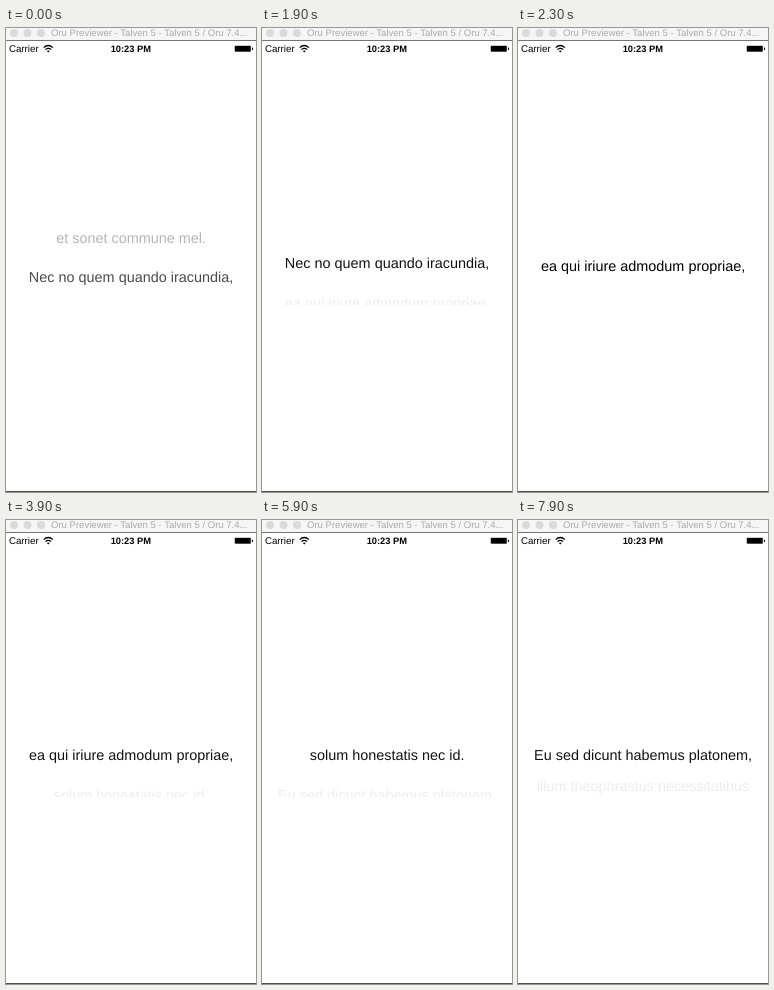
These frames come from a looping animation (250 by 464 pixels, 8 s). An HTML page:

```html
<!DOCTYPE html>
<html lang="en">
<head>
<meta charset="utf-8">
<title>Scrolling label</title>
<style>
  html, body { margin: 0; width: 100%; height: 100%; overflow: hidden; background: #fff; }
  svg { display: block; width: 250px; height: 464px; }
  text {
    font-family: "Liberation Sans", Arial, sans-serif;
    text-rendering: geometricPrecision;
  }
  .title { font-size: 9.55px; fill: #aaa; }
  .status { font-size: 9.75px; }
  .clock { font-size: 9.3px; font-weight: bold; text-anchor: middle; }
  .line { font-size: 14.43px; text-anchor: middle; }
</style>
</head>
<body>
<svg viewBox="0 0 250 464">
  <clipPath id="label"><rect y="199" width="250" height="78"/></clipPath>

  <!-- window bar -->
  <rect width="250" height="12" fill="#f6f6f6"/>
  <g fill="#dadada">
    <circle cx="8" cy="5" r="4"/>
    <circle cx="21.5" cy="5" r="4"/>
    <circle cx="35" cy="5" r="4"/>
  </g>
  <text class="title" x="45" y="8.3">Oru Previewer - Talven 5 - Talven 5 / Oru 7.4...</text>
  <rect y="12" width="250" height="1" fill="#757575"/>
  <rect y="463" width="250" height="1" fill="#505050"/>

  <!-- status bar -->
  <text class="status" x="2.9" y="24.2">Carrier</text>
  <g fill="none" stroke="#000" stroke-width="1.2">
    <path d="M37.7 19.6Q42.3 15.4 46.9 19.6"/>
    <path d="M39.4 21.6Q42.3 19.1 45.2 21.6"/>
  </g>
  <path d="M40.9 23.1Q42.3 22 43.7 23.1L42.3 24.6z"/>
  <text class="clock" x="124.8" y="24.2">10:23 PM</text>
  <rect x="228.4" y="17.4" width="16.8" height="6.6" rx="1.2" fill="#999"/>
  <rect x="229" y="18" width="15.6" height="5.4" rx=".6"/>
  <rect x="246" y="19.6" width="1" height="2.4" rx=".5"/>

  <g clip-path="url(#label)">
    <text class="line" id="leaving" x="125.1"></text>
    <text class="line" id="entering" x="125.1"></text>
  </g>
</svg>
<script>
  const LOOP = 8000, CYCLE = 2000, STEP = 100, LEAD = 100;
  const BASELINE = 243, TRAVEL = 39.3;
  const PROGRESS = [0.07, 0.71, 0.965, 0.995];
  const LINES = [
    { text: "et sonet commune mel." },
    { text: "Nec no quem quando iracundia," },
    { text: "ea qui iriure admodum propriae," },
    { text: "solum honestatis nec id." },
    { text: "Eu sed dicunt habemus platonem," },
    { text: "illum theophrastus necessitatibus", lift: 8.5 }
  ];
  const leaving = document.getElementById("leaving");
  const entering = document.getElementById("entering");

  function place(node, { text, lift = 0 }, shift, alpha) {
    if (node.textContent !== text) node.textContent = text;
    node.setAttribute("y", BASELINE + shift - lift);
    node.setAttribute("opacity", alpha);
  }

  function draw(time) {
    const t = time % LOOP + LEAD;
    const index = Math.floor(t / CYCLE);
    const p = PROGRESS[Math.floor(t % CYCLE / STEP)] ?? 1;
    place(leaving, LINES[index], -TRAVEL * p, 1 - p);
    place(entering, LINES[index + 1], TRAVEL * (1 - p), p);
  }

  const start = performance.now();
  function tick() {
    draw(performance.now() - start);
    requestAnimationFrame(tick);
  }
  tick();
</script>
</body>
</html>
```
